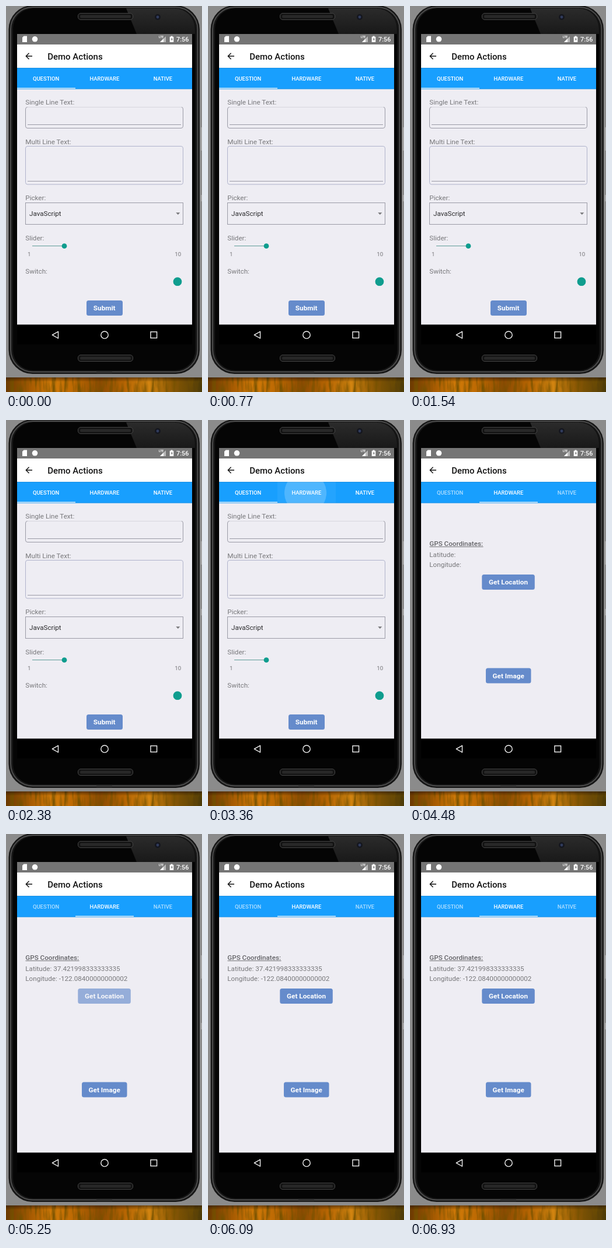
Write an HTML page that moves like this. It is 336x662 px and loops after 7000 ms.

```html
<!DOCTYPE html>
<html lang="en">
<head>
<meta charset="utf-8">
<title>Demo Actions</title>
<style>
  html, body { margin: 0; width: 100%; height: 100%; overflow: hidden; background: #8b8b8b; }
  svg { display: block; width: 336px; height: 662px; font-family: Roboto, "Open Sans", sans-serif; }

  .label { font-size: 11.65px; fill: #78787b; }
  .value { font-size: 11.65px; fill: #2b2b2d; }
  .scale { font-size: 9.8px; fill: #77777a; }
  .tab { font-size: 9.45px; font-weight: 500; fill: #fff; text-anchor: middle; }
  .btn rect { fill: #658bcb; }
  .btn text { font-size: 11.75px; font-weight: 700; fill: #fff; text-anchor: middle; }
  .line { fill: none; stroke: #9a9aa6; stroke-width: 1; }

  /* One percent of the loop is one 70 ms tick. */
  .anim { animation: 7s step-end -5ms infinite; }
  .pages { animation-name: slide; }
  .bar { animation-name: bar; }
  .still { animation-name: still; }
  .moving { animation-name: moving; }
  .ripple { animation-name: ripple; }
  .tile { animation-name: tile; }
  .t1 { animation-name: t1; }
  .t2 { animation-name: t2; }
  .t3 { animation-name: t3; }
  .press { animation-name: press; }
  .result { animation-name: result; }

  @keyframes slide {
    0% { transform: translateX(0); }
    52% { transform: translateX(-45px); }
    53% { transform: translateX(-127.5px); }
    54% { transform: translateX(-205px); }
    55% { transform: translateX(-255px); }
    56% { transform: translateX(-282px); }
    57% { transform: translateX(-295px); }
    58%, 100% { transform: translateX(-300px); }
  }
  @keyframes bar {
    0% { transform: translateX(0); }
    54% { transform: translateX(48px); }
    55% { transform: translateX(78px); }
    56% { transform: translateX(92px); }
    57% { transform: translateX(98px); }
    58%, 100% { transform: translateX(100px); }
  }
  @keyframes still { 0% { opacity: 1; } 52%, 100% { opacity: 0; } }
  @keyframes moving { 0% { opacity: 0; } 52%, 100% { opacity: 1; } }
  @keyframes ripple {
    0% { opacity: 0; transform: scale(.5); }
    47% { opacity: .2; transform: scale(.5); }
    48% { opacity: .2; transform: scale(1); }
    49% { opacity: .16; transform: scale(1.25); }
    50% { opacity: .11; transform: scale(1.45); }
    51% { opacity: .06; transform: scale(1.6); }
    52%, 100% { opacity: 0; transform: scale(1.6); }
  }
  @keyframes tile {
    0% { opacity: 0; }
    47% { opacity: .05; }
    54% { opacity: .03; }
    55%, 100% { opacity: 0; }
  }
  @keyframes t1 {
    0% { opacity: 1; }
    54% { opacity: .85; }
    55% { opacity: .75; }
    56%, 100% { opacity: .66; }
  }
  @keyframes t2 {
    0% { opacity: 1; }
    52% { opacity: .66; }
    54% { opacity: .8; }
    55% { opacity: .92; }
    56%, 100% { opacity: 1; }
  }
  @keyframes t3 { 0% { opacity: 1; } 52%, 100% { opacity: .66; } }
  @keyframes press {
    0% { opacity: 1; }
    72% { opacity: .7; }
    73% { opacity: .4; }
    74% { opacity: .45; }
    75% { opacity: .65; }
    76% { opacity: .82; }
    77% { opacity: .94; }
    78%, 100% { opacity: 1; }
  }
  @keyframes result { 0% { opacity: 0; } 74%, 100% { opacity: 1; } }
</style>
</head>
<body>
<svg viewBox="0 0 336 662" role="img" aria-label="Phone showing a form and a location page">
  <defs>
    <clipPath id="view"><rect x="19" y="142" width="300" height="404.5"/></clipPath>
    <clipPath id="tabs"><rect x="19" y="106" width="300" height="36.5"/></clipPath>
    <linearGradient id="wood">
      <stop offset="0" stop-color="#6b3a02"/>
      <stop offset=".13" stop-color="#a85c02"/>
      <stop offset=".24" stop-color="#d07a08"/>
      <stop offset=".36" stop-color="#b96602"/>
      <stop offset=".48" stop-color="#8a4a02"/>
      <stop offset=".6" stop-color="#b46302"/>
      <stop offset=".73" stop-color="#d28410"/>
      <stop offset=".84" stop-color="#8f5a04"/>
      <stop offset="1" stop-color="#4b3a08"/>
    </linearGradient>
    <linearGradient id="shade" x2="0" y2="1">
      <stop offset="0" stop-color="#1c0d02" stop-opacity=".5"/>
      <stop offset=".3" stop-color="#1c0d02" stop-opacity="0"/>
    </linearGradient>
    <linearGradient id="gloss" x2="0" y2="1">
      <stop offset="0" stop-color="#2b2b2b"/>
      <stop offset="1" stop-color="#191919"/>
    </linearGradient>
    <filter id="grain" x="0" y="0" width="100%" height="100%">
      <feTurbulence type="fractalNoise" baseFrequency=".14 .02" numOctaves="3" seed="7"/>
      <feColorMatrix values="0 0 0 0 .17  0 0 0 0 .08  0 0 0 0 0  2.6 0 0 0 -1.1"/>
    </filter>
    <g id="speaker">
      <rect x="123.5" y="-5.5" width="94" height="11" rx="4.5" fill="#141414" stroke="#454545"/>
      <rect x="127" y="-2.5" width="87" height="5" rx="2.5" fill="#282828"/>
    </g>
  </defs>

  <!-- Desk and phone body -->
  <rect width="336" height="662" fill="#8b8b8b"/>
  <rect y="637" width="336" height="25" fill="url(#wood)"/>
  <rect y="637" width="336" height="25" filter="url(#grain)"/>
  <rect y="637" width="336" height="25" fill="url(#shade)"/>
  <path d="M334 208h2v40h-2zM334 324h2v11h-2z" fill="#a8a8a8"/>
  <rect x="4.5" y="-1" width="327.5" height="632" rx="41" fill="#161616"/>
  <rect x="8" y="2" width="320.5" height="625.5" rx="38" fill="none" stroke="#4c4c4c" stroke-width="2"/>
  <rect x="12" y="4" width="312.5" height="621" rx="35" fill="#050505"/>
  <path d="M206 4H289A35 35 0 0 1 324 39V48H224z" fill="url(#gloss)"/>
  <path d="M155 628h27" stroke="#333" stroke-width="3"/>
  <use href="#speaker" y="18"/>
  <use href="#speaker" y="604"/>
  <circle cx="260" cy="19" r="5" fill="#15171f"/>
  <circle cx="260" cy="19" r="2.4" fill="#303b5c"/>

  <!-- Status bar -->
  <rect x="19" y="48" width="300" height="18" fill="#757575"/>
  <g fill="#fff">
    <path d="M30.5 51.5H36V62h-8V54z"/>
    <circle cx="49.5" cy="56.8" r="4.8"/>
    <text x="262" y="55" font-size="5" font-weight="700">LTE</text>
    <path d="M264 62L274 52V62z" opacity=".5"/>
    <path d="M264 62L270 56V62z"/>
    <path d="M282.5 51.5h3v1.2h1.8V62h-6.6v-9.3h1.8z"/>
    <text x="292" y="60.6" font-size="10.9" font-weight="500">7:56</text>
  </g>
  <path d="M284.7 54l-2.2 3.6h1.4V60l2.1-3.6h-1.3z" fill="#757575"/>

  <!-- App bar -->
  <rect x="19" y="66" width="300" height="40" fill="#fff"/>
  <path d="M45 86H34.5M39.5 80.8L34.3 86l5.2 5.2" fill="none" stroke="#111" stroke-width="1.4"/>
  <text x="71.2" y="91.7" font-size="15" font-weight="500" fill="#111">Demo Actions</text>

  <!-- Pages -->
  <rect x="19" y="142" width="300" height="405" fill="#eeedf3"/>
  <g clip-path="url(#view)">
    <g class="anim pages">
      <g class="label">
        <text x="33.3" y="169">Single Line Text:</text>
        <text x="33.3" y="237">Multi Line Text:</text>
        <text x="33.3" y="333.2">Picker:</text>
        <text x="33.3" y="402">Slider:</text>
        <text x="33.3" y="459.2">Switch:</text>
      </g>

      <g class="line">
        <g class="anim still">
          <path d="M36 173.5H302" stroke="#d6d6de"/>
          <path d="M36.5 173.5Q33.5 173.5 33.5 177V206Q33.5 209.5 37 209.5M301 173.5Q303.5 173.5 303.5 177V206Q303.5 209.5 300 209.5"/>
          <rect x="33.5" y="240.5" width="270" height="65.5" rx="3.5" stroke="#b0b3cb"/>
          <path d="M33.5 337V375M303.5 337V375"/>
        </g>
        <path d="M37 203.5H300M37 209.5H300M37 300.5H300M33 337.5H304M33 374.5H304"/>
        <path class="anim moving" d="M302 173.5l1.5 1.5M302 209.5l1.5-1.5M302 240.5l1.5 1.5M302 305.5l1.5-1.5"/>
      </g>
      <text class="value" x="40" y="360.4">JavaScript</text>
      <path d="M291.3 354.3h7l-3.5 3.6z" fill="#77777a"/>

      <path d="M45 411.5H100" stroke="#5f9d98" stroke-width="1.1"/>
      <circle cx="100" cy="411.7" r="4.4" fill="#0f9d8e"/>
      <text class="scale" x="37" y="429.2">1</text>
      <text class="scale" x="289.3" y="429.2">10</text>

      <rect class="anim moving" x="276" y="470" width="20" height="7" rx="3.5" fill="#9bd0ca"/>
      <circle cx="294" cy="472.7" r="7.4" fill="#0f9d8e"/>

      <g class="btn">
        <rect x="138" y="505" width="62" height="26" rx="3.5"/>
        <text x="168.7" y="522.2">Submit</text>
      </g>

      <g transform="translate(300)">
        <g class="label">
          <text x="33.3" y="215.6" font-weight="500" fill="#636367">GPS Coordinates:</text>
          <path d="M33.5 217.5H125.5" stroke="#77777a"/>
          <text x="33.3" y="235">Latitude:</text>
          <text x="33.3" y="252.3">Longitude:</text>
          <g class="anim result">
            <text x="81.3" y="235">37.421998333333335</text>
            <text x="90.8" y="252.3">-122.08400000000002</text>
          </g>
        </g>
        <g class="btn anim press">
          <rect x="123.3" y="265" width="90.5" height="26" rx="3.5"/>
          <text x="168.6" y="282.4">Get Location</text>
        </g>
        <g class="btn">
          <rect x="130" y="425.5" width="77.5" height="26" rx="3.5"/>
          <text x="168.7" y="442.8">Get Image</text>
        </g>
      </g>
    </g>
  </g>

  <!-- Tabs -->
  <rect x="19" y="106" width="300" height="36.5" fill="#189ffe"/>
  <g clip-path="url(#tabs)">
    <path d="M19 106.5H319M19 142H319" stroke="#1b8fe2"/>
    <rect class="anim tile" x="119" y="106" width="100" height="36" fill="#fff"/>
    <g transform="translate(167 125)"><circle class="anim ripple" r="36" fill="#fff"/></g>
    <rect class="anim bar" x="19" y="140.3" width="100" height="1.6" fill="#d3e8f7"/>
  </g>
  <g class="tab">
    <text class="anim t1" x="68.6" y="128">QUESTION</text>
    <text class="anim t2" x="168.9" y="128">HARDWARE</text>
    <text class="anim t3" x="269" y="128">NATIVE</text>
  </g>

  <!-- Navigation bar -->
  <rect x="19" y="546.4" width="300" height="34" fill="#000"/>
  <g fill="none" stroke="#f2f2f2" stroke-width="1.4">
    <path d="M89.5 558.3V570L79.3 564.2z" stroke-linejoin="round"/>
    <circle cx="169" cy="564.2" r="6.2"/>
    <rect x="248" y="558.8" width="10.6" height="10.6"/>
  </g>
</svg>
</body>
</html>
```
